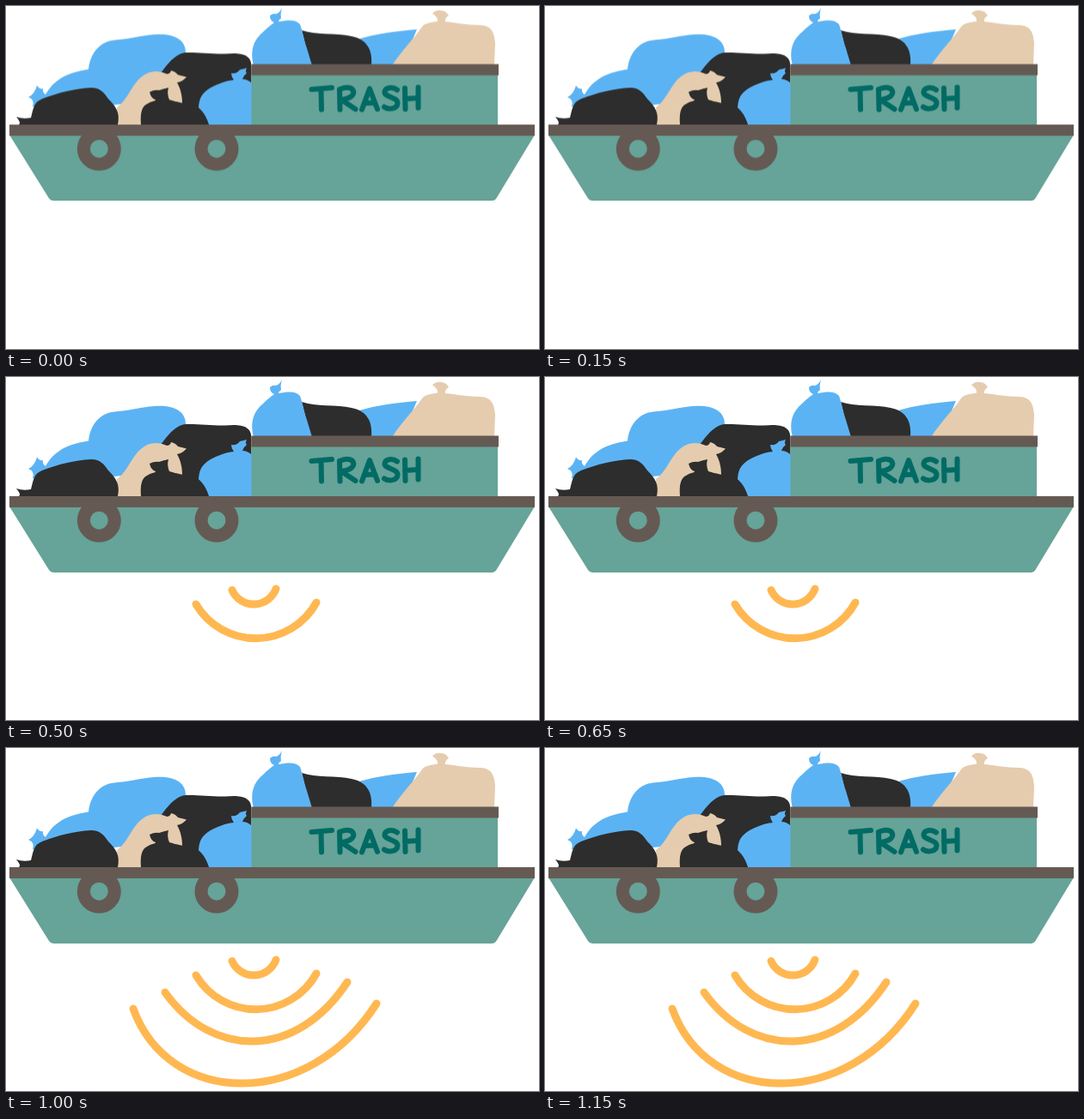
Animation, 620 px wide and 400 px high, one loop 1250 ms. Source, as an HTML page:

```html
<!DOCTYPE html>
<html lang="en">
<head>
<meta charset="utf-8">
<title>Trash barge</title>
<style>
  html, body { margin: 0; width: 100%; height: 100%; overflow: hidden; background: #fff; }
  svg { display: block; width: 620px; height: 400px; }
  .teal { fill: #66a398; }
  .brown { fill: #655a53; }
  .blue { fill: #5cb3f4; }
  .black { fill: #2d2d2d; }
  .tan { fill: #e5ccae; }
  .lettering { fill: none; stroke: #006b64; stroke-width: 6; stroke-linecap: round; stroke-linejoin: round; }
  .tire { fill: #66a398; stroke: #655a53; stroke-width: 15; }
  .waves { fill: none; stroke: #ffb851; stroke-width: 9; stroke-linecap: round; }

  .barge { animation: settle 1.25s step-end infinite; }
  .waves path { animation: 1.25s step-end infinite; }
  .waves path:nth-child(1) { animation-name: wave1; }
  .waves path:nth-child(2) { animation-name: wave2; }
  .waves path:nth-child(3) { animation-name: wave3; }
  .waves path:nth-child(4) { animation-name: wave4; }

  @keyframes settle { 0% { transform: translateY(-.7px); } 20%, 100% { transform: none; } }
  @keyframes wave1 { 0% { opacity: 0; } 20%, 100% { opacity: 1; } }
  @keyframes wave2 { 0% { opacity: 0; } 40%, 100% { opacity: 1; } }
  @keyframes wave3 { 0% { opacity: 0; } 60%, 100% { opacity: 1; } }
  @keyframes wave4 { 0% { opacity: 0; } 80%, 100% { opacity: 1; } }
</style>
</head>
<body>
<svg viewBox="0 0 620 400">
  <g class="barge">
    <!-- open heap -->
    <path class="blue" d="M26 107Q33 104 36 93.5Q39 98 43 97Q42 101 46 104C54 90 66 79 96 74.5C98 55 110 42 126 40.500C146 39 158 35 172 34C192 32 210 38 209 56L190 110L60 122L31 118Q34 110 26 107Z"/>
    <path class="black" d="M180 79C188 68 196 58 206 55.500C216 54 240 57 255 56.500C272 55 286 56 285.500 72V139H190Z"/>
    <path class="tan" d="M129 139V119C142 110 146 92 158 83C166 76 177 75 187 80Q191 80 192 76Q197 77 200 81L210 83.500Q205 89 199 90C203 97 205 105 205 115L180 122L158 139Z"/>
    <path class="blue" d="M236 139L224 122C224 108 228 102 238 96C246 92 254 88 265 87Q262 83 262 79Q269 80 272 75Q277 74 280 73Q278 77 280 79Q276 82 275 86Q281 86 286 91V139Z"/>
    <path class="black" d="M157 139C156 125 158 118 164 115C170 111 174 112 174 110Q169 109 167 101Q173 98 178 99Q184 97 189 96Q187 103 190 110C200 113 205 114 214 114.500C226 118 232 126 236 139Z"/>
    <path class="black" d="M12 130Q20 133 29 131C32 120 32 113 42 109C60 102 80 97 99 96C110 96 114 102 119 109C128 118 133 125 130 139H15Q18 137 12 130Z"/>

    <!-- heap in the container -->
    <path class="blue" d="M411 39C430 33 455 30 478 28L460 70H420Z"/>
    <path class="black" d="M344 29C360 35 385 32 402 36C418 39 427 50 425 70H354Z"/>
    <path class="blue" d="M288 70C283 50 290 39 298 32C304 26 308 23 312 20Q307 18 307 12Q310 9 314 10Q318 9 321 3Q319 10 320 15Q317 17 317 19C328 17 337 16 342 22C345 30 347 42 350 50L356 70Z"/>
    <path class="tan" d="M449 70C460 53 475 38 484 25C488 20 494 20 502 18.500Q503 14 496 9.500Q500 5 506 6Q512 6 515 12Q510 15 511 19C522 20 535 23 550 23C562 23 568 28 569 44L568 70Z"/>

    <!-- barge -->
    <path class="teal" d="M285.500 80H572V140H285.500Z"/>
    <path class="brown" d="M285.500 68.500H573V81.500H285.500Z"/>
    <path class="teal" d="M4 151H615L571 224Q569 228 565 228H56Q52 228 50 225Z"/>
    <path class="brown" d="M4 139H615V152H4Z"/>
    <circle class="tire" cx="108.3" cy="167.200" r="18"/>
    <circle class="tire" cx="245" cy="167.200" r="18"/>
    <g class="lettering" role="img" aria-label="TRASH">
      <path d="M355.500 98L379 96M366.500 98L367 121.500"/>
      <path d="M388 98L388.500 121.500M388 98C398 93 406 97 404 103C402 108 396 109 390 110L406.500 121"/>
      <path d="M414 121.500L423 97L432 121M417 114L429 113.500"/>
      <path d="M455 98.500C449 94 441 96 440.500 101C440 107 456 107 455.500 114C455 121 445 122 440 118.500"/>
      <path d="M464 96.500L464.500 121M479.500 95.500L479.500 119.500M464 109L479 108"/>
    </g>
  </g>
  <g class="waves">
    <path d="M263 248.500A27.500 27.500 0 0 0 314 247"/>
    <path d="M221 265A80.500 80.500 0 0 0 361 263"/>
    <path d="M185 285C240 362 337 364 397 273"/>
    <path d="M148 304C190 420 352 422 431 298"/>
  </g>
</svg>
</body>
</html>
```
